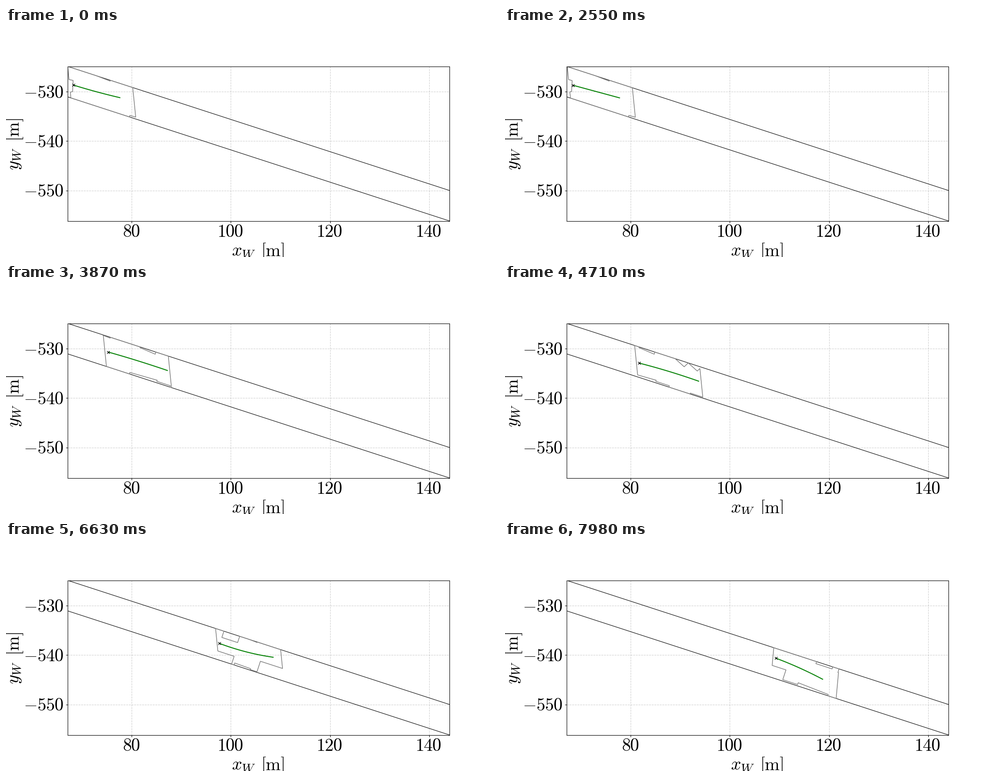
Animation of 1095 by 511 pixels, one loop 8000 ms. Source, as a matplotlib script:

```python
import math

import numpy as np
import matplotlib.pyplot as plt
from matplotlib.animation import FuncAnimation
from matplotlib.transforms import Affine2D

WIDTH, HEIGHT, DPI = 1095, 511, 100
LOOP_MS, INTERVAL, STEP_MS = 8000, 25, 30
LEFT, RIGHT, TOP, BOTTOM = 136.9, 985.2, 85.8, 430.9
SLOPE, ROAD, VIEW = 0.3265, 68, 144.5
FONT = 28.5

plt.rcParams["mathtext.fontset"] = "cm"
fig = plt.figure(figsize=(WIDTH / DPI, HEIGHT / DPI), dpi=DPI, facecolor="white")
px = Affine2D().scale(1, -1).translate(0, HEIGHT)


def upper(x):
    return 85.7 + SLOPE * (x - 137)


def lower(x):
    return upper(x) + ROAD


# Axes, grid and labels
ax = fig.add_axes([LEFT / WIDTH, 1 - BOTTOM / HEIGHT,
                   (RIGHT - LEFT) / WIDTH, (BOTTOM - TOP) / HEIGHT])
ax.set_xlim(67.084, 144.132)
ax.set_ylim(-556.19, -524.92)
ax.set_xticks(range(80, 141, 20))
ax.set_yticks(range(-550, -529, 10))
ax.tick_params(length=3, width=0.8, labelbottom=False, labelleft=False)
ax.grid(linestyle="--", linewidth=0.8, color="#b0b0b0", alpha=0.6)
ax.set_axisbelow(True)


def label(x, y, text, **style):
    fig.text(x, y, f"${text}$", transform=px, fontsize=FONT, color="black",
             va="baseline", **style)


def digits(n):
    sign = "-" if n < 0 else ""
    return sign + r"\hspace{-0.03}".join(str(abs(n)))


for n in range(80, 141, 20):
    label(278 + 11 * (n - 80), 466, digits(n), ha="center")
for n in range(530, 551, 10):
    label(127, 155.5 + 11.03 * (n - 530), digits(-n), ha="right")

upright = dict(rotation=90, rotation_mode="anchor", ha="left")
label(501, 509, "x_W", ha="left")
label(566, 509, r"\mathrm{[m]}", ha="left")
label(28.5, 317, "y_W", **upright)
label(28.5, 253, r"\mathrm{[m]}", **upright)


def track(t, *keys):
    """Value at time t between (time, value) keys."""
    return np.interp(t, *zip(*keys))


def block(x0, x1, d0, d1, side=upper):
    """Object standing square on one road side, d0 to d1 deep."""
    into = 1 if side is upper else -1

    def corner(x, d):
        return x - into * SLOPE * d, side(x) + into * d

    return [corner(x0, 0), corner(x0, d0), corner(x1, d1), corner(x1, 0)]


def spike(x, width=29, depth=11.6):
    tip = x + 0.69 * width
    return [(x, upper(x)), (tip, upper(tip) + depth), (x + width, upper(x + width))]


def chain(*shapes):
    """Join shapes in order; where two share a foot, the foot disappears."""
    line = []
    for shape in shapes:
        if line and line[-1] == shape[0]:
            line.pop()
            shape = shape[1:]
        line += shape
    return line


def clip(points, side):
    """Keep the part of a polygon where side(x, y) is not negative."""
    kept = []
    for a, b in zip(points, points[1:] + points[:1]):
        sa, sb = side(*a), side(*b)
        if sa >= 0:
            kept.append(a)
        if (sa >= 0) != (sb >= 0):
            k = sa / (sa - sb)
            kept.append((a[0] + k * (b[0] - a[0]), a[1] + k * (b[1] - a[1])))
    return kept


def free_space(t):
    sway = math.exp(-((t - 1650) / 500) ** 2)
    near = track(t, (5550, 0), (6630, 1))  # objects grow while approached
    ceiling = chain(
        block(200, 232, 0, 1.8),
        block(298, 333, 1.5, 4.7),
        spike(378) + spike(407)[1:],
        block(484, 519, 6 + 8 * near, 6 + 8 * near),
        block(540, 558, 0, 1),
        block(692, 728, 4.5, 4.5),
        block(742, 772, 8, 8),
    )
    floor = chain(
        block(274, 334, 3.3 + 2 * sway, 5.5, lower),
        block(334, 364, 3, 3, lower),
        block(411, 448, 2, 2, lower),
        block(460, 501, 9.5 + 8 * near, 9.5 + 8 * near, lower),
        block(506.5, 542, 4.3, 3.3, lower),
        block(542, 557, 1.3, 1.3, lower),
        block(557, 616, 24.7, 24.7, lower),
        block(616, 649, 2.8, 2.8, lower),
        block(649, 717, 6.8, 2.8, lower),
    )
    rear = [(143 - sway, 143 - 7 * sway), (148, 142 - 9 * sway),
            (149 + 4 * sway, 117 + 10 * sway), (140 - sway, 115 - 8 * sway)]
    return ([(137, upper(137))] + ceiling + [(985, upper(985)), (985, lower(985))]
            + floor[::-1] + [(144, lower(144))] + rear)


def view_outline(t, start):
    slant = track(t, (6630, 6.8), (7980, -6.2))

    def edge(x0):
        return lambda x, y: x - x0 - (y - upper(x0)) * slant / ROAD

    far = edge(start + VIEW)
    shape = clip(free_space(t), edge(start))
    shape = clip(shape, lambda x, y: -far(x, y))
    return np.array(shape + shape[:1])


# Road sides and moving parts
ends = np.array([LEFT, RIGHT])
for side in (upper, lower):
    ax.plot(ends, side(ends), color="black", lw=0.8, transform=px)
outline, = ax.plot([], [], color="gray", lw=1.1, transform=px)
path, = ax.plot([], [], color="green", lw=1.5, transform=px)
vehicle, = ax.plot([], [], "x", color="black", ms=4, mew=0.9, transform=px)
s = np.linspace(0, 1, 40)


def update(i):
    t = math.ceil(i * INTERVAL / STEP_MS) * STEP_MS
    start = 137 + track(t, (2460, 0), (2850, 6), (3240, 25.5), (3870, 79),
                        (5550, 223), (6630, 328.5), (7980, 460))
    x = start + track(t, (2550, 13), (6630, 8), (7980, 4.5))
    y = upper(x) + track(t, (2550, 37.5), (3870, 34.5), (5550, 37.5), (7980, 21.9))
    length = track(t, (2550, 103), (3870, 131), (5550, 132.5), (7980, 104))
    drop = track(t, (2550, 28), (3870, 41), (5550, 39.5), (6630, 31), (7980, 47))
    bend = track(t, (0, 4), (1650, 4), (2550, 0), (5550, -9), (6630, 14), (7980, -8))

    outline.set_data(*view_outline(t, start).T)
    path.set_data(x + length * s, y + drop * s + bend * s * (1 - s))
    vehicle.set_data([x], [y])
    return outline, path, vehicle


anim = FuncAnimation(fig, update, frames=LOOP_MS // INTERVAL, interval=INTERVAL,
                     repeat=True, repeat_delay=0, blit=False)
plt.show()
```
